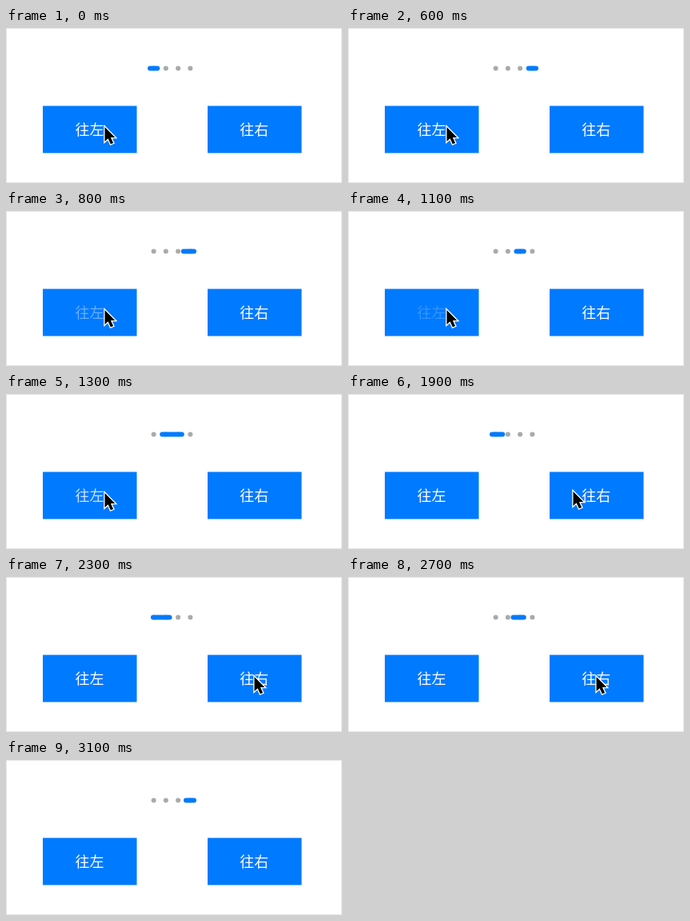
Write an HTML page that moves like this. It is 420 px wide and 194 px high and loops after 3.2 s.

```html
<!DOCTYPE html>
<html lang="zh-CN">
<head>
<meta charset="utf-8">
<style>
  html, body { margin: 0; width: 100%; height: 100%; overflow: hidden; background: #fff; }
  svg { display: block; }
  text { font: 18px "Noto Sans CJK SC", "Noto Sans CJK", sans-serif; fill: #fff; text-anchor: middle; }
</style>
</head>
<body>
<svg width="420" height="194" viewBox="0 0 420 194">
  <rect x=".5" y=".5" width="419" height="193" fill="#fff" stroke="#e6e6e6"/>
  <g id="dots" fill="#aaa"></g>
  <rect id="pill" y="47.5" height="6" rx="3" fill="#007aff"/>
  <g fill="#007aff">
    <rect x="46" y="97.5" width="117.5" height="59"/>
    <rect x="252" y="97.5" width="117.5" height="59"/>
  </g>
  <text id="left" x="104.5" y="134">往左</text>
  <text id="right" x="310.3" y="134">往右</text>
  <path id="cursor" d="M0 0V18L4.1 14.2 7.3 21.3 10.6 19.9 7.4 12.9H12.8Z"
        stroke="#fff" stroke-width="2.6" paint-order="stroke"/>
</svg>
<script>
const LOOP = 3200, STEP = 100;
const SLOT = 15.25, FIRST = 177;   // pill width equals the slot pitch
const HALF = 150;                  // stretch time, then the same for shrinking
const PRESS = 60, FADE = 200;

const clicks = [
  { at: 150, from: 0, to: 3, side: 'left' },
  { at: 750, from: 3, to: 2, side: 'left' },
  { at: 1150, from: 2, to: 1, side: 'left' },
  { at: 1650, from: 1, to: 0, side: 'left' },
  { at: 2100, from: 0, to: 1, side: 'right' },
  { at: 2450, from: 1, to: 2, side: 'right' },
  { at: 2820, from: 2, to: 3, side: 'right' }
];
// time, x, y of the pointer tip
const path = [[1690, 123.5, 124], [1900, 281.5, 122], [2050, 310.5, 125]];

const $ = id => document.getElementById(id);
const clamp = v => Math.min(1, Math.max(0, v));
const ease = v => { v = clamp(v); return v * v * (3 - 2 * v); };
const mix = (a, b, p) => a + (b - a) * p;

for (let i = 0; i < 4; i++) {
  const dot = document.createElementNS('http://www.w3.org/2000/svg', 'circle');
  dot.setAttribute('cx', FIRST + SLOT * (i + 0.5));
  dot.setAttribute('cy', 50.5);
  dot.setAttribute('r', 3);
  $('dots').append(dot);
}

function drawPill(t) {
  const { at, from, to } = clicks.findLast(c => t >= c.at) || { at: 0, from: 0, to: 0 };
  const lead = mix(from, to, ease((t - at) / HALF));
  const trail = mix(from, to, ease((t - at - HALF) / HALF));
  $('pill').setAttribute('x', FIRST + SLOT * Math.min(lead, trail));
  $('pill').setAttribute('width', SLOT * (1 + Math.abs(lead - trail)));
}

function labelOpacity(t, side) {
  const click = clicks.findLast(c => c.side === side && t >= c.at - PRESS);
  return click ? mix(0.2, 1, clamp((t - click.at) / FADE)) : 1;
}

function drawCursor(t) {
  let [, x, y] = path[0];
  for (let i = 1; i < path.length; i++) {
    const [start] = path[i - 1], [end, nextX, nextY] = path[i];
    const p = ease((t - start) / (end - start));
    x = mix(x, nextX, p);
    y = mix(y, nextY, p);
  }
  $('cursor').setAttribute('transform', `translate(${x} ${y})`);
  $('cursor').setAttribute('visibility', t < 3100 ? 'visible' : 'hidden');
}

function draw() {
  const t = Math.floor(performance.now() % LOOP / STEP) * STEP;
  drawPill(t);
  for (const side of ['left', 'right']) $(side).setAttribute('opacity', labelOpacity(t, side));
  drawCursor(t);
  requestAnimationFrame(draw);
}
draw();
</script>
</body>
</html>
```
